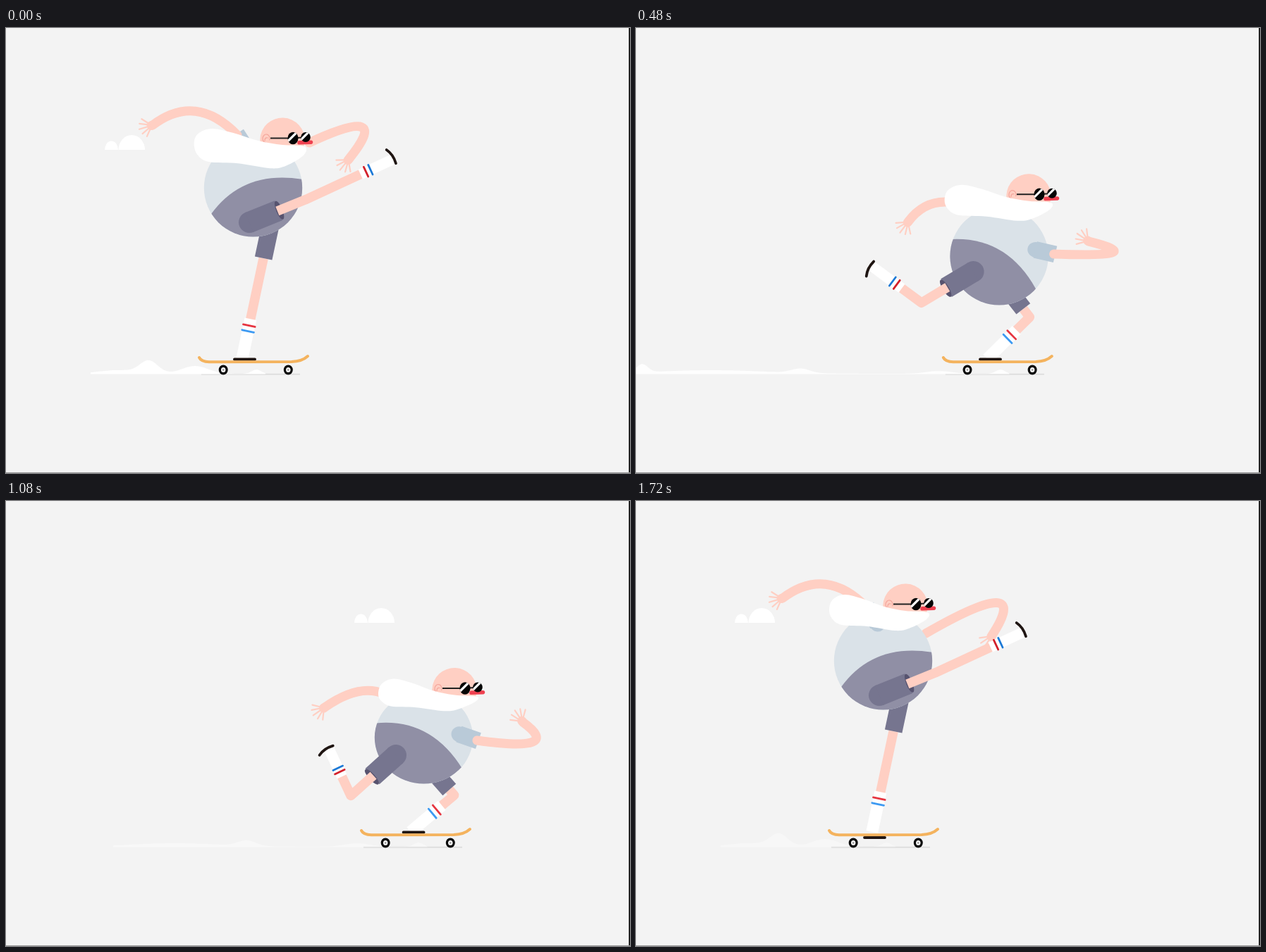
An HTML page with a canvas that plays this animation: 885x632 px, repeating every 1760 ms.

```html
<!DOCTYPE html>
<html lang="en">
<head>
<meta charset="utf-8">
<title>Skater</title>
<style>
  html, body { margin: 0; width: 100%; height: 100%; overflow: hidden; background: #f3f3f3; }
  canvas { display: block; width: 100%; height: 100%; }
</style>
</head>
<body>
<canvas id="stage" width="885" height="632"></canvas>
<script>
const ctx = document.getElementById('stage').getContext('2d');
const LOOP = 1760, STEP = 40;
const SKIN = '#ffcfc3', SLEEVE = '#76758f', SHIRT_SLEEVE = '#b9cad8', INK = '#1f1512';

// Positions are relative to the belly, angles in degrees.
// body: height on stage, tilt, radii      beard: stretch, sag      hip: standing leg
// leg: hip, thigh angle, shin angle and length, sock length
// arms: shoulder, then angle and length to the elbow handle and on to the wrist
// dust: reach behind the board, opacity
const KICK = {
  body: [227, -21, 69.7, 69.5], head: [31.5, -78], beard: [1, 1], hip: [24],
  leg: [-5.5, 49, -22, -24.8, 136, 50],
  nearArm: [-22.5, -75, 226, 84, 143, 77], farArm: [60.5, -39, -30, 177, 123, 109],
  dust: [153, 0.3]
};
const START = {
  ...KICK, head: [41.5, -68], beard: [1.16, 1.15],
  farArm: [79.5, -64, -25, 133, 129, 102], dust: [153, 1]
};
const TUCK = {
  body: [324, 31, 69.7, 69.5], head: [41.5, -86], beard: [1.05, 1], hip: [19.5],
  leg: [-36.5, 22, 149, 210, 92, 55],
  nearArm: [77.5, -3, 2, 141, 194, 94], farArm: [-55.5, -74, 195, 47, 127, 46],
  dust: [371, 1]
};
const REACH = {
  ...TUCK, head: [42.5, -83.5], beard: [1.16, 1],
  leg: [-36.5, 22, 149, 221, 84, 49], dust: [471, 0.75]
};
const CROUCH = {
  body: [336, 28, 69.7, 65.5], head: [43.5, -67.5], beard: [1, 0.85], hip: [20.5],
  leg: [-39.5, 25, 138, 245, 73, 43],
  nearArm: [75.5, 4, 8, 126, 216, 74], farArm: [-56.5, -62, 204, 38, 145, 60],
  dust: [351, 0.4]
};
const SWING = {
  body: [256.5, -10, 65.5, 69.5], head: [39, -78.5], beard: [0.94, 1], hip: [6.5],
  leg: [-25.5, 33.5, 14, 21.6, 101, 51],
  nearArm: [-33.5, -45.5, 179, 85, 127, 94], farArm: [56.5, -32.5, -19, 91, 69, 62],
  dust: [172, 0.3]
};
const RISE = {
  ...KICK, head: [39, -75], hip: [15.5],
  leg: [-16.5, 41, -7, -4, 112, 43],
  nearArm: [-63.5, -64, 180, 65, 140, 41], farArm: [61.5, -38, -24, 169, 126, 98]
};
const TIMES = [0, 320, 640, 1080, 1320, 1520, 1720];
const POSES = [START, TUCK, REACH, CROUCH, SWING, RISE, KICK];
const BOARD = [273, 398, 461, 503, 412, 342, 273];

// Beard outline around the head centre
const BEARD = [[-108, 5], [-103, -9], [-86, -16], [-60, -10], [-30, 1], [0, 7], [31, 9],
  [30, 19], [5, 32], [-15, 35], [-54, 29], [-90, 27], [-104, 18]];

const clamp = v => Math.max(0, Math.min(1, v));
const radians = degrees => degrees * Math.PI / 180;
const heading = (a, b) => Math.atan2(b[1] - a[1], b[0] - a[0]);
const toward = ([x, y], angle, length) => [x + length * Math.cos(angle), y + length * Math.sin(angle)];

// Monotone cubic interpolation over TIMES.
function ease(values, t) {
  const last = TIMES.length - 1;
  if (t >= TIMES[last]) return values[last];
  const rate = i => (values[i + 1] - values[i]) / (TIMES[i + 1] - TIMES[i]);
  const slope = i => {
    if (i === 0) return rate(0);
    if (i === last) return rate(last - 1);
    const a = rate(i - 1), b = rate(i);
    return a * b > 0 ? 2 * a * b / (a + b) : 0;
  };
  let i = 0;
  while (t >= TIMES[i + 1]) i++;
  const span = TIMES[i + 1] - TIMES[i], u = (t - TIMES[i]) / span, w = 1 - u;
  return values[i] * w * w * (1 + 2 * u) + values[i + 1] * u * u * (3 - 2 * u)
    + span * (slope(i) * u * w * w - slope(i + 1) * u * u * w);
}

function poseAt(t) {
  const pose = {};
  for (const part in KICK)
    pose[part] = KICK[part].map((_, c) => ease(POSES.map(p => p[part][c]), t));
  return pose;
}

function stroke(color, width, cap = 'round') {
  Object.assign(ctx, { strokeStyle: color, lineWidth: width, lineCap: cap, lineJoin: 'round' });
  ctx.stroke();
}
function line(points, color, width, cap = 'butt') {
  ctx.beginPath();
  points.forEach(p => ctx.lineTo(...p));
  stroke(color, width, cap);
}
function oval(x, y, rx, ry, color, from = 0, to = 7) {
  ctx.beginPath();
  ctx.ellipse(x, y, rx, ry, 0, from, to);
  ctx.fillStyle = color;
  ctx.fill();
}
function at([x, y], angle, draw) {
  ctx.save();
  ctx.translate(x, y);
  ctx.rotate(angle);
  draw();
  ctx.restore();
}

// Smooth closed white shape through the points.
function blob(points) {
  const n = points.length;
  ctx.beginPath();
  ctx.moveTo(...points[0]);
  for (let i = 0; i < n; i++) {
    const [a, b, c, d] = [i - 1, i, i + 1, i + 2].map(k => points[(k + n) % n]);
    ctx.bezierCurveTo(b[0] + (c[0] - a[0]) / 6, b[1] + (c[1] - a[1]) / 6,
      c[0] - (d[0] - b[0]) / 6, c[1] - (d[1] - b[1]) / 6, ...c);
  }
  ctx.fillStyle = '#fff';
  ctx.fill();
}

function drawArm(body, [x, y, upper, upperLength, lower, lowerLength], handTurn = 0) {
  const shoulder = [body[0] + x, body[1] + y];
  const elbow = toward(shoulder, radians(upper), upperLength);
  const wrist = toward(elbow, radians(lower), lowerLength);
  ctx.beginPath();
  ctx.moveTo(...shoulder);
  ctx.quadraticCurveTo(...elbow, ...wrist);
  stroke(SKIN, 13);
  at(wrist, radians(lower + handTurn), () => {
    oval(2, 0, 6.5, 6.5, SKIN);
    for (let f = -2; f <= 2; f++)
      line([[4, f * 1.5], toward([0, 0], f * 0.4, 20 - Math.abs(f))], SKIN, 2.2, 'round');
  });
}

function drawSleeve(body, [x, y, upper]) {
  at([body[0] + x, body[1] + y], radians(upper + 9), () => {
    oval(-26, -1, 12, 11, SHIRT_SLEEVE);
    line([[-27, -1], [2, 0]], SHIRT_SLEEVE, 24);
  });
}

function drawLowerLeg(end, knee, heel, sock, width, red, blue) {
  line([end, knee, heel], SKIN, 13.5);
  at(heel, heading(knee, heel), () => {
    line([[-sock, 0], [1, 0]], '#fff', width);
    for (const [part, color] of [[0.83, red], [0.69, blue]])
      line([[-sock * part, -width / 2], [-sock * part, width / 2]], color, 2.8, 'round');
  });
}

// The standing foot stays on the board; the knee bends forward as he crouches.
function drawStandingLeg(t, board, lean, body, tilt, hipX) {
  const hip = [body[0] + hipX, body[1] + 56];
  const heel = [board + 62 + lean * 0.8, 469];
  const bend = clamp((tilt + 10) / 38);
  const knee = [hip[0] + 0.4 * (heel[0] - hip[0]) + 38 * bend, hip[1] + 0.4 * (heel[1] - hip[1]) - 5 * bend];
  const hem = toward(hip, heading(hip, knee), 45 - 21 * bend);
  drawLowerLeg(hem, knee, heel, 57, 17, '#e63540', '#3d9af2');
  const soleY = 470.5 + 7.5 * clamp((t - 1320) / 200);
  line([[heel[0] - 11, soleY], [heel[0] + 18, soleY]], INK, 3.8, 'round');
  line([hip, hem], SLEEVE, 25);
}

function drawFreeLeg(body, [x, y, thigh, shin, shinLength, sock]) {
  const hip = [body[0] + x, body[1] + y];
  const knee = toward(hip, radians(thigh), 86);
  const heel = toward(knee, radians(shin), shinLength);
  at(hip, radians(thigh), () => {
    oval(0, 0, 15, 15, SLEEVE);
    ctx.fillStyle = SLEEVE;
    ctx.fillRect(0, -15, 45, 30);
    oval(46, 0, 4.5, 14, '#57536f');
  });
  drawLowerLeg(toward(hip, radians(thigh), 43), knee, heel, sock, 15, '#d3202b', '#1c79d6');
  at(heel, radians(shin), () => {
    ctx.beginPath();
    ctx.moveTo(2, 7);
    ctx.quadraticCurveTo(4, -6, -2, -16);
    stroke(INK, 3.8);
  });
}

function drawBelly(center, tilt, rx, ry, neckY) {
  ctx.save();
  ctx.beginPath();
  ctx.rect(0, neckY, 885, 632);
  ctx.clip();
  oval(...center, rx, ry, '#dae2e8');
  ctx.clip();
  at(center, radians(tilt), () => {
    ctx.beginPath();
    ctx.moveTo(-69, 13.4);
    ctx.quadraticCurveTo(-4, -29, 69, 13.4);
    ctx.lineTo(80, 80);
    ctx.lineTo(-80, 80);
    ctx.fillStyle = '#908fa5';
    ctx.fill();
  });
  ctx.restore();
}

function drawLens(x, y, rx, ry) {
  oval(x, y, rx, ry, '#050505');
  ctx.save();
  ctx.clip();
  line([[x - 8, y + 5], [x + 6, y - 9]], '#fff', 3.2);
  ctx.restore();
}

function drawHead(center, [stretch, sag]) {
  at(center, 0, () => {
    oval(0, 0, 31.7, 31.5, SKIN, Math.PI - 0.35, 2 * Math.PI + 0.35);
    ctx.beginPath();
    ctx.ellipse(-23, -2, 5, 6, 0, 1.8, 6.6);
    ctx.moveTo(-25, 1);
    ctx.quadraticCurveTo(-25, -4, -21, -3);
    stroke('#f4a69c', 1.2);
    blob(BEARD.map(([x, y]) => [x < 0 ? x * stretch : x, y > 10 ? y * sag : y]));
    line([[24, 3.8], [40.5, 3.2]], '#ee4150', 5.5, 'round');
    line([[-17, -2.5], [9, -2.5]], '#222', 2);
    line([[20, -3], [29, -3.5]], '#222', 2);
    drawLens(15, -2.5, 7.5, 8.8);
    drawLens(33, -4, 6.8, 7);
  });
}

function drawBoard(x) {
  ctx.beginPath();
  ctx.moveTo(x + 1, 468);
  ctx.quadraticCurveTo(x + 4, 474, x + 15, 474.3);
  ctx.lineTo(x + 132, 474);
  ctx.quadraticCurveTo(x + 147, 473.5, x + 155, 466);
  stroke('#f4b35e', 4);
  for (const wheel of [x + 35.2, x + 127.3]) {
    oval(wheel, 485.5, 6.5, 7, '#0a0a0a');
    oval(wheel, 485.5, 3.2, 3.5, '#fff');
    oval(wheel, 485.5, 1.5, 1.7, '#aaa');
  }
}

// Low bumps along the ground, with one tall plume thrown up by the push.
function drawDust(t, board, [reach, alpha]) {
  const bump = (x, center, height, width) => height * Math.exp(-(((x - center) / width) ** 2));
  const spread = 153 / reach;
  const plume = 70 * Math.exp(-(((t - 320) / 120) ** 2));
  ctx.globalAlpha = alpha;
  ctx.fillStyle = '#fff';
  ctx.beginPath();
  ctx.moveTo(board - reach, 491.5);
  for (let x = -reach; x <= 95; x += 4) {
    const height = bump(x, -reach * 0.46, 18 * spread, 18) + bump(x, -5, 11 * spread, 26)
      + bump(x, 82, 6, 9) + bump(x, -reach * 0.75, 5, reach / 4) + bump(x, 12 - reach, plume, 11);
    ctx.lineTo(board + x, 491 - height);
  }
  ctx.lineTo(board + 95, 491.5);
  ctx.fill();
  ctx.globalAlpha = 1;
}

// Leaves on the left, then fades in again from the right.
function drawCloud(t) {
  const x = t < 480 ? 140 - 0.534 * t
    : t < 1080 ? 494 + (1080 - t) * 0.7045
    : 140 + Math.max(0, 1720 - t) * 0.553;
  ctx.globalAlpha = t < 480 ? 1 : clamp((t - 520) / 220);
  oval(x + 9.5, 173, 9.5, 12.5, '#fff', Math.PI, 2 * Math.PI);
  oval(x + 38.3, 173, 18.8, 21, '#fff', Math.PI, 2 * Math.PI);
  ctx.globalAlpha = 1;
}

function render(t) {
  const pose = poseAt(t), board = ease(BOARD, t);
  const [bodyY, tilt, rx, ry] = pose.body;
  const lean = 12 * (clamp((t - 320) / 700) - clamp((t - 1320) / 400));
  const body = [board + 77.5 + lean, bodyY];
  const head = [body[0] + pose.head[0], body[1] + pose.head[1]];

  ctx.fillStyle = '#f3f3f3';
  ctx.fillRect(0, 0, 885, 632);
  line([[board + 4, 491.7], [board + 144, 491.7]], '#dedede', 2);
  drawDust(t, board, pose.dust);
  drawArm(body, pose.farArm);
  drawStandingLeg(t, board, lean, body, tilt, pose.hip[0]);
  drawBelly(body, tilt, rx, ry, head[1] + 2);
  drawFreeLeg(body, pose.leg);
  drawSleeve(body, pose.nearArm);
  drawArm(body, pose.nearArm, 20);
  drawHead(head, pose.beard);
  drawBoard(board);
  drawCloud(t);
  ctx.fillStyle = '#000';
  ctx.fillRect(883.4, 0, 1.6, 632);
  ctx.fillStyle = '#999';
  ctx.fillRect(0, 631, 885, 1);
}

function frame(now) {
  render(Math.floor(now % LOOP / STEP) * STEP);
  requestAnimationFrame(frame);
}
requestAnimationFrame(frame);
</script>
</body>
</html>
```
